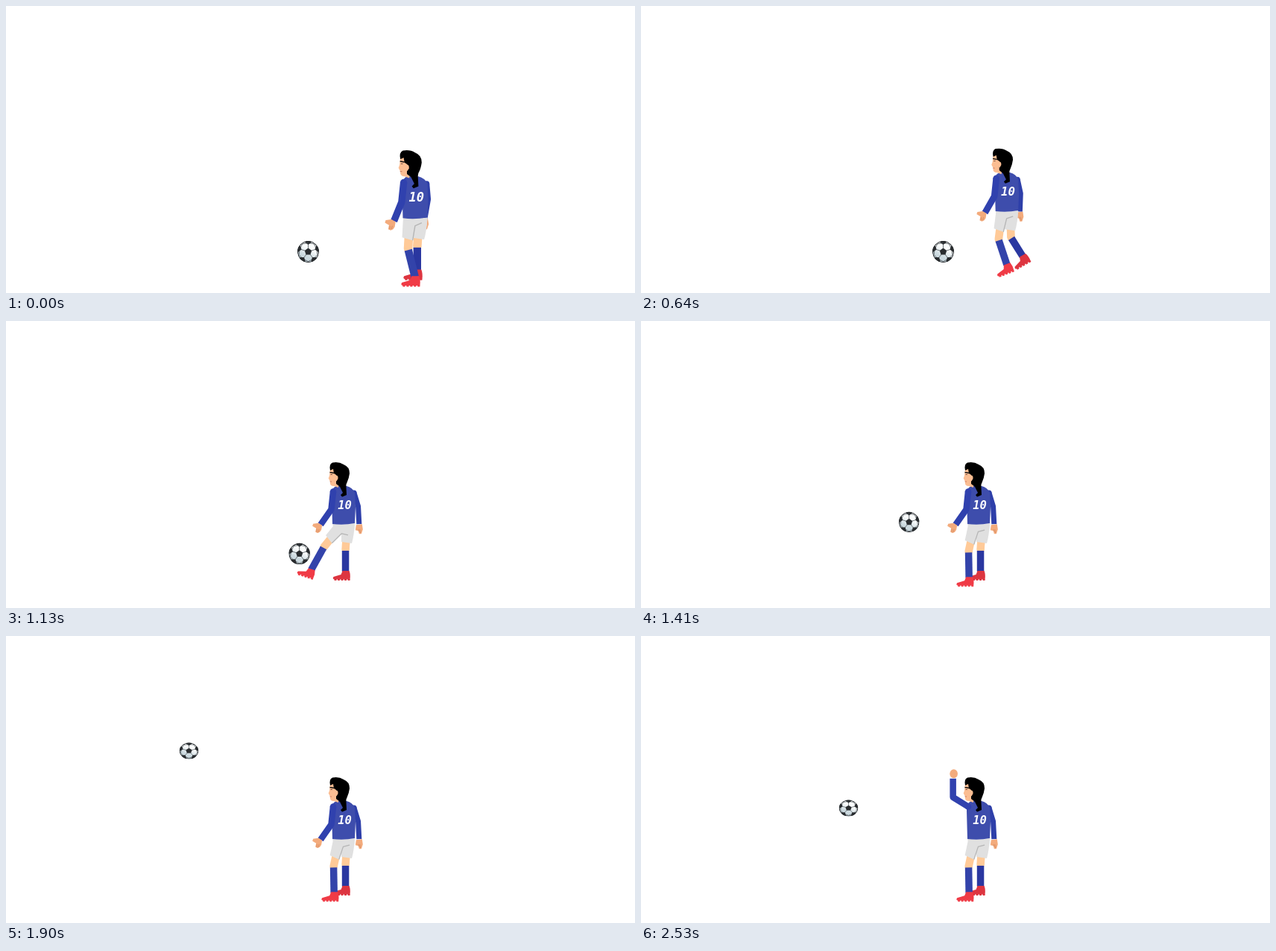
Animation, 844 px wide and 386 px high, one loop 2600 ms. Source, as an HTML page with a canvas:

```html
<!DOCTYPE html>
<html lang="en">
<head>
<meta charset="utf-8">
<title>Free kick</title>
<style>
  html, body { margin: 0; width: 100%; height: 100%; overflow: hidden; background: #fff; }
  canvas { display: block; }
</style>
</head>
<body>
<canvas id="stage" width="844" height="386"></canvas>
<script>
const ctx = document.getElementById('stage').getContext('2d');
const LOOP = 2600, HOLD = 500, STEP = 70;
const RAD = Math.PI / 180;
const SKIN = '#ffca98', HAND = '#f3ab7c', CREASE = '#c87e58', SHORTS = '#e0e0e0', INK = '#292c2f';

// Corner points of the ball's path: kick-off, lift, flight, impact, rebound.
const ballPath = [
  { step: 8, x: 405.5, y: 330.5 },
  { step: 13, x: 376, y: 287 },
  { step: 21, x: 245.5, y: 154.5 },
  { step: 23, x: 202, y: 125 },
  { step: 30, x: 278.5, y: 231.5 }
];

const shapes = {
  body: 'M443 222H457Q465 224 468 231L469 250L468 272Q453 275 438 273L437 235Q436 225 443 222Z',
  hips: 'M438 272Q453 275 468 272L467 283H440Z',
  farShort: 'M450 274L468 273Q467 288 464 299L450 297Z',
  nearShort: 'M-8 -4L9 -4L7 2L5 20L-8 17Z',
  shortSeam: 'M5 20L7 2L15 -2',
  shoe: 'M-4 -1L5 -1Q7 4 6 10.5H-15Q-18 10 -16 7L-6 4Z',
  studs: 'M-15 11H6',
  face: 'M435 199L444 199L446 212L446 224L440 222Q434 222 435 216L434 214L432.7 211.5L434 208Z',
  brow: 'M434.5 203.5L440 204.5',
  eye: 'M435.5 206.5H438',
  mouth: 'M434.5 216H437',
  hair: 'M435 201Q433 193 438 190.5Q447 189 453 193Q461 196 461 205Q460 212 458 216Q456 219 456.5 224L457 234L451 236.5L449 234L452 231L448 223L443 219L443 213L445 211L443 207L440 205L439 199Z',
  ear: 'M441.5 208Q446 206.5 445.5 212L443.5 215.5L441.5 213Z',
  frontHand: 'M2 1L1 7L-1 10L-4 11.5L-7 10L-6 5L-11 2L-10 -1L-3 -2Z',
  backHand: 'M-4 1L4 0L5 7L3 13L0 13L-1 9L-5 8Z',
  frontFingers: 'M-2 6L-3 10M-5 6L-5 10',
  backFingers: 'M1 7L2 12M-1 7L0 10'
};
for (const name in shapes) shapes[name] = new Path2D(shapes[name]);

const mix = (a, b, k) => a + (b - a) * k;
const ramp = (t, from, to) => Math.min(1, Math.max(0, (t - from) / (to - from)));
const bump = (t, from, peak, to) => Math.min(ramp(t, from, peak), ramp(t, to, peak));

function fill(name, color) {
  ctx.fillStyle = color;
  ctx.fill(shapes[name]);
}

function line(name, color, width = 1) {
  ctx.strokeStyle = color;
  ctx.lineWidth = width;
  ctx.stroke(shapes[name]);
}

function at([x, y], degrees, draw) {
  ctx.save();
  ctx.translate(x, y);
  ctx.rotate(degrees * RAD);
  draw();
  ctx.restore();
}

function limb(points, width, color) {
  ctx.beginPath();
  points.forEach(p => ctx.lineTo(...p));
  ctx.lineJoin = 'round';
  ctx.lineWidth = width;
  ctx.strokeStyle = color;
  ctx.stroke();
}

function ellipse(x, y, rx, ry, color) {
  ctx.beginPath();
  ctx.ellipse(x, y, rx, ry, 0, 0, 2 * Math.PI);
  ctx.fillStyle = color;
  ctx.fill();
}

// Angles are measured from straight down; positive swings to the left.
const reach = ([x, y], degrees, length) =>
  [x - Math.sin(degrees * RAD) * length, y + Math.cos(degrees * RAD) * length];

function leg(hip, pose, thighLength, shinLength, sock, shoe) {
  const knee = reach(hip, pose.thigh, thighLength);
  const ankle = reach(knee, pose.shin, shinLength);
  limb([hip, knee], 10.5, SKIN);
  ellipse(...knee, 5, 5, SKIN);
  limb([reach(knee, pose.shin, 1), ankle], 9.5, sock);
  at(ankle, pose.foot, () => {
    fill('shoe', shoe);
    ctx.setLineDash([3, 1.5]);
    line('studs', shoe, 2);
    ctx.setLineDash([]);
  });
}

function arm(shoulder, upper, fore, upperLength, foreLength, width, color) {
  const elbow = reach(shoulder, upper, upperLength);
  const wrist = reach(elbow, fore, foreLength);
  ellipse(...shoulder, width / 2, width / 2, color);
  limb([shoulder, elbow, wrist], width, color);
  return wrist;
}

function drawPlayer(step) {
  const walk = ramp(step, 0, 5);
  const start = 1 - ramp(step, 0, 1);
  const farStride = bump(step, 1, 3, 5);
  const windUp = bump(step, 2, 5, 8);
  const kick = bump(step, 8, 10, 14);
  const cheer = ramp(step, 21, 27);
  const scale = 1 + .1 * (1 - walk) ** 2;

  ctx.save();
  ctx.translate(mix(527, 433, walk), mix(194, 190, walk));
  ctx.scale(scale, scale);
  ctx.translate(-433, -190);

  const backWrist = arm([467, 231], mix(-5, -17, walk), mix(10, -3, walk), 19, 24, 7, '#2e3fa9');
  at(backWrist, 0, () => {
    fill('backHand', HAND);
    line('backFingers', CREASE, .6);
  });

  const farLeg = { thigh: 4 - 6 * farStride, shin: -32 * farStride, foot: -30 * farStride };
  const nearLeg = {
    thigh: 12 - 9 * start - 14 * windUp + 27 * kick,
    shin: -1 - 13 * start - 52 * windUp + 30 * kick,
    foot: -62 * windUp + 18 * kick
  };
  const nearHip = [446, 280];
  leg([457.5, 280], farLeg, 28, 29, '#2a37a0', '#dd3540');
  leg(nearHip, nearLeg, 31, 35, '#3343aa', '#f03b46');

  fill('farShort', SHORTS);
  fill('hips', SHORTS);
  at(nearHip, nearLeg.thigh, () => {
    fill('nearShort', SHORTS);
    line('shortSeam', '#b5b5b5', 1.3);
  });

  fill('body', '#3e4dac');
  const fore = mix(mix(22, 35, walk), 180, cheer);
  const frontWrist = arm([439, 229.5], mix(6, 122, cheer), fore, 24, 25, 8.5, '#3041ae');
  at(frontWrist, 0, () => {
    if (cheer > .5) {
      ellipse(1, -6.5, 5.3, 6, HAND);
    } else {
      fill('frontHand', HAND);
      line('frontFingers', CREASE, .6);
    }
  });

  fill('face', '#fbbd92');
  line('brow', '#111', 1.4);
  line('eye', '#5b3a30', .8);
  line('mouth', '#c87058', .8);
  fill('hair', '#000');
  fill('ear', '#fbbd92');

  ctx.fillStyle = '#fff';
  ctx.font = 'italic bold 15.5px "DejaVu Sans Mono", monospace';
  ctx.textAlign = 'center';
  ctx.fillText('10', 454.5, 252.5);
  ctx.restore();
}

function pentagon([x, y], radius, turn) {
  ctx.beginPath();
  for (let i = 0; i < 5; i++) ctx.lineTo(...reach([x, y], turn + i * 72, radius));
  ctx.closePath();
  ctx.fillStyle = INK;
  ctx.fill();
}

function ballPosition(step) {
  const next = Math.max(1, ballPath.findIndex(p => p.step >= step));
  const from = ballPath[next - 1], to = ballPath[next];
  const k = ramp(step, from.step, to.step);
  return [mix(from.x, to.x, k), mix(from.y, to.y, k)];
}

function drawBall(step) {
  const size = mix(1, .88, ramp(step, 8, 21));
  const squash = mix(1, .86, ramp(step, 14, 21));
  const center = [0, 0];
  ctx.save();
  ctx.translate(...ballPosition(step));
  ctx.scale(size, size * squash);

  const shade = ctx.createLinearGradient(5, -10, -5, 10);
  shade.addColorStop(.3, '#fafcfc');
  shade.addColorStop(.8, '#cbd9df');
  ellipse(0, 0, 14.5, 14.5, shade);
  ctx.clip();
  pentagon(center, 5, 180);
  for (let i = 0; i < 5; i++) {
    const turn = 180 + i * 72;
    limb([reach(center, turn, 4), reach(center, turn, 11)], .8, '#4b5257');
    limb([reach(center, turn, 12), reach(center, turn + 36, 13), reach(center, turn + 72, 12)], .8, '#4b5257');
    pentagon(reach(center, turn, 14), 4.6, turn + 180);
  }
  ctx.beginPath();
  ctx.arc(0, 0, 14, 0, 2 * Math.PI);
  ctx.lineWidth = 1.2;
  ctx.strokeStyle = INK;
  ctx.stroke();
  ctx.restore();
}

function render() {
  const time = performance.now() % LOOP;
  const step = time < HOLD ? 0 : 1 + Math.floor((time - HOLD) / STEP);
  ctx.clearRect(0, 0, 844, 386);
  drawPlayer(step);
  drawBall(step);
  requestAnimationFrame(render);
}
render();
</script>
</body>
</html>
```
